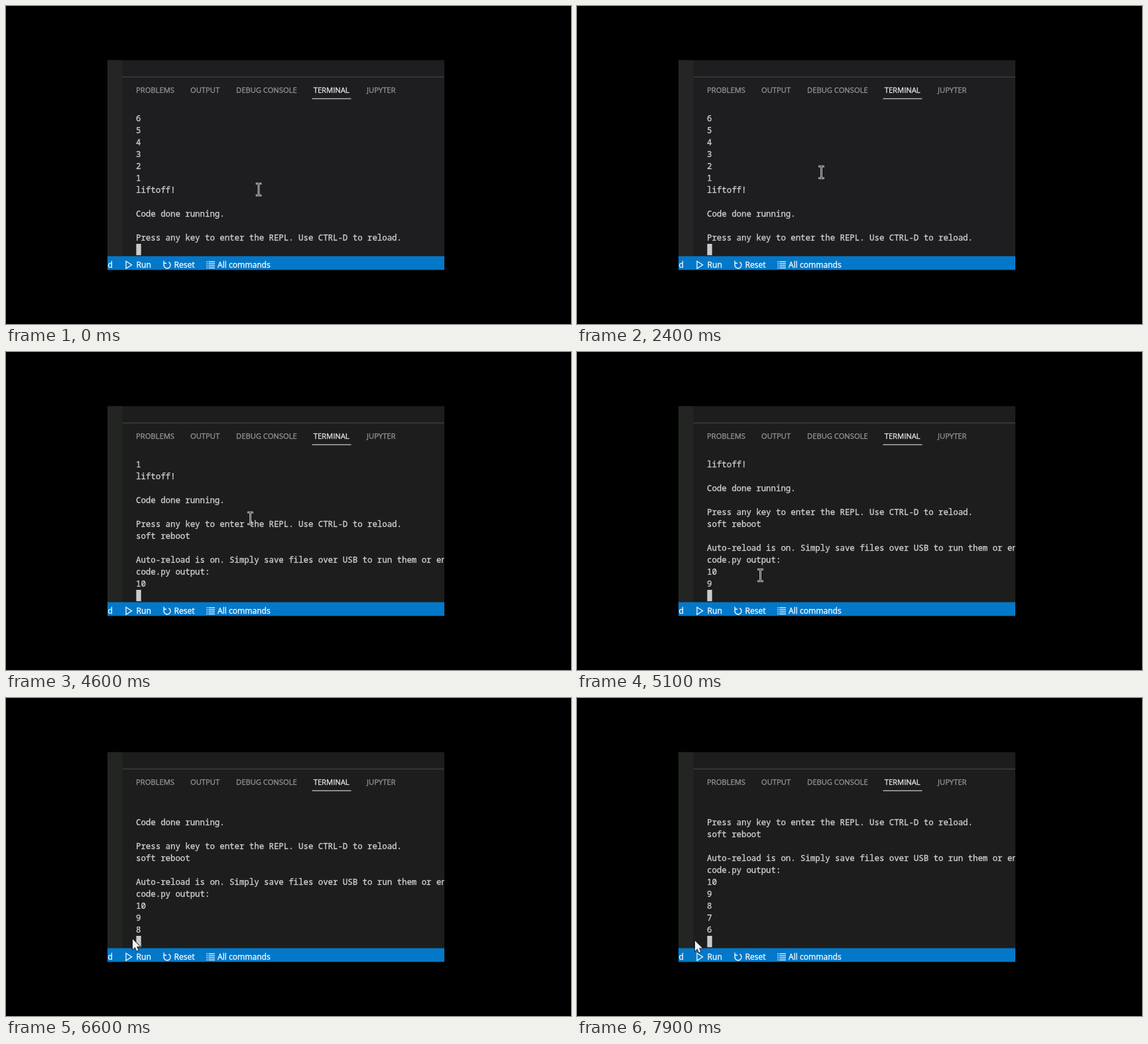
Write an HTML page with a canvas that moves like this. It is 852 by 480 pixels and loops after 8 s.

```html
<!DOCTYPE html>
<html lang="en">
<head>
<meta charset="utf-8">
<title>Terminal countdown</title>
<style>
  html, body { margin: 0; width: 100%; height: 100%; overflow: hidden; background: #000; }
  canvas { display: block; width: 852px; height: 480px; }
</style>
</head>
<body>
<canvas id="stage" width="852" height="480"></canvas>
<script>
const ctx = document.getElementById('stage').getContext('2d');
const LOOP = 8000, STEP = 100;
const MONO = '12.39px "Noto Sans Mono", "DejaVu Sans Mono", monospace';
const UI = '"Open Sans", "Noto Sans", sans-serif';
const PANEL = { x: 153, y: 81.5, w: 508, h: 317 };
const ROWS = 11, ROW_H = 18, TEXT_X = 196, FIRST_BASE = 173.5;

const RELOAD_AT = 3700, TICK = 1000, SHADE_AT = 4600;
const firstRun = ['6', '5', '4', '3', '2', '1', 'liftoff!', '', 'Code done running.', '',
  'Press any key to enter the REPL. Use CTRL-D to reload.'];
const secondRun = ['soft reboot', '',
  'Auto-reload is on. Simply save files over USB to run them or enter REPL to disable.',
  'code.py output:'];

const tabs = [['PROBLEMS', 196], ['OUTPUT', 278], ['DEBUG CONSOLE', 347], ['TERMINAL', 463.7], ['JUPYTER', 544]];

// Pointer hotspot: time, x, y
const path = [
  [0, 381, 277], [500, 374, 236], [900, 370, 246], [1500, 368.5, 251], [4600, 368.5, 251],
  [5100, 276.5, 337], [5500, 193, 358], [5700, 191, 360.5], [6400, 191, 364],
  [7200, 191, 364], [7800, 178, 366.5], [8000, 178, 366.5]
];

function pointerAt(t) {
  const i = path.findIndex((p, k) => k > 0 && t <= p[0]);
  const [t0, x0, y0] = path[i - 1], [t1, x1, y1] = path[i];
  const k = (t - t0) / (t1 - t0);
  return [x0 + (x1 - x0) * k, y0 + (y1 - y0) * k];
}

function linesAt(t) {
  if (t < RELOAD_AT) return firstRun;
  const count = Math.floor((t - RELOAD_AT) / TICK) + 1;
  const numbers = Array.from({ length: count }, (_, i) => String(10 - i));
  return [...firstRun, ...secondRun, ...numbers].slice(-ROWS);
}

function rect(color, x, y, w, h) {
  ctx.fillStyle = color;
  ctx.fillRect(x, y, w, h);
}

// A hairline stroke gives the text its slightly heavy weight.
function text(str, x, y, font, color, align = 'left') {
  ctx.font = font;
  ctx.fillStyle = ctx.strokeStyle = color;
  ctx.textAlign = align;
  ctx.lineWidth = 0.35;
  ctx.fillText(str, x, y);
  ctx.strokeText(str, x, y);
}

function trace(points, close) {
  ctx.beginPath();
  points.forEach(([x, y]) => ctx.lineTo(x, y));
  if (close) ctx.closePath();
}

function stroke(color, width) {
  ctx.strokeStyle = color;
  ctx.lineWidth = width;
  ctx.stroke();
}

function drawTabs() {
  rect('#454545', 175.5, 106.5, 485.5, 1.2);
  for (const [name, x] of tabs) {
    text(name, x, 131, '11.2px ' + UI, name === 'TERMINAL' ? '#e2e2e2' : '#929292');
  }
  rect('#d2d2d2', 461.5, 139.3, 59, 1.2);
}

function drawTerminal(t) {
  linesAt(t).forEach((line, i) => text(line, TEXT_X, FIRST_BASE + i * ROW_H, MONO, '#cecece'));
  rect('#cbcbcb', 196.4, 359, 7.3, 17.2);
}

function drawStatusBar() {
  const white = '#f4f9fd';
  const label = (str, x, align) => text(str, x, 395, '12.1px ' + UI, white, align);
  rect('#0478c8', PANEL.x, 377.6, PANEL.w, 21);
  label('ed', 161, 'right');
  label('Run', 196.5);
  label('Reset', 253.5);
  label('All commands', 319);

  trace([[181, 385.2], [189.6, 390.8], [181, 396.4]], true);
  stroke(white, 1.3);

  ctx.beginPath();
  ctx.arc(243, 391, 5, -1.1, 3.75);
  stroke(white, 1.4);
  trace([[238, 384.6], [238, 388.3], [242, 388.3]]);
  stroke(white, 1.4);

  for (let i = 0; i < 4; i++) {
    const y = 385.4 + i * 3.1;
    rect(white, 302.3, y, 1.8, 1.3);
    rect(white, 305.2, y, 9.8, 1.3);
  }
}

function drawBeam() {
  const shape = () => {
    ctx.beginPath();
    for (const s of [-1, 1]) {
      ctx.moveTo(-2.9, 8.8 * s);
      ctx.lineTo(2.9, 8.8 * s);
    }
    ctx.moveTo(0, -8.8);
    ctx.lineTo(0, 8.8);
  };
  ctx.lineCap = 'square';
  shape();
  stroke('#d0d0d0', 2.8);
  shape();
  stroke('#333', 0.9);
  ctx.lineCap = 'butt';
}

function drawArrow() {
  trace([[0, 0], [0, 15.4], [3.5, 12], [6, 17.8], [8.5, 16.7], [6.1, 11.1], [11, 11.1]], true);
  stroke('#161616', 1.5);
  ctx.fillStyle = '#f2f2f2';
  ctx.fill();
}

function drawPointer(t) {
  const [x, y] = pointerAt(t);
  ctx.save();
  ctx.translate(x, y);
  if (x < 196) drawArrow(); else drawBeam();
  ctx.restore();
}

function draw(t) {
  const early = t < SHADE_AT;
  rect('#000', 0, 0, 852, 480);
  ctx.save();
  ctx.beginPath();
  ctx.rect(PANEL.x, PANEL.y, PANEL.w, PANEL.h);
  ctx.clip();
  rect(early ? '#1e1d1f' : '#1d1d1d', PANEL.x, PANEL.y, PANEL.w, PANEL.h);
  rect(early ? '#252526' : '#222522', PANEL.x, PANEL.y, 22.5, PANEL.h);
  drawTabs();
  drawTerminal(t);
  drawStatusBar();
  drawPointer(t);
  ctx.restore();
}

const start = performance.now();
function tick() {
  const t = (performance.now() - start) % LOOP;
  draw(Math.floor(t / STEP) * STEP);
  requestAnimationFrame(tick);
}
tick();
</script>
</body>
</html>
```
